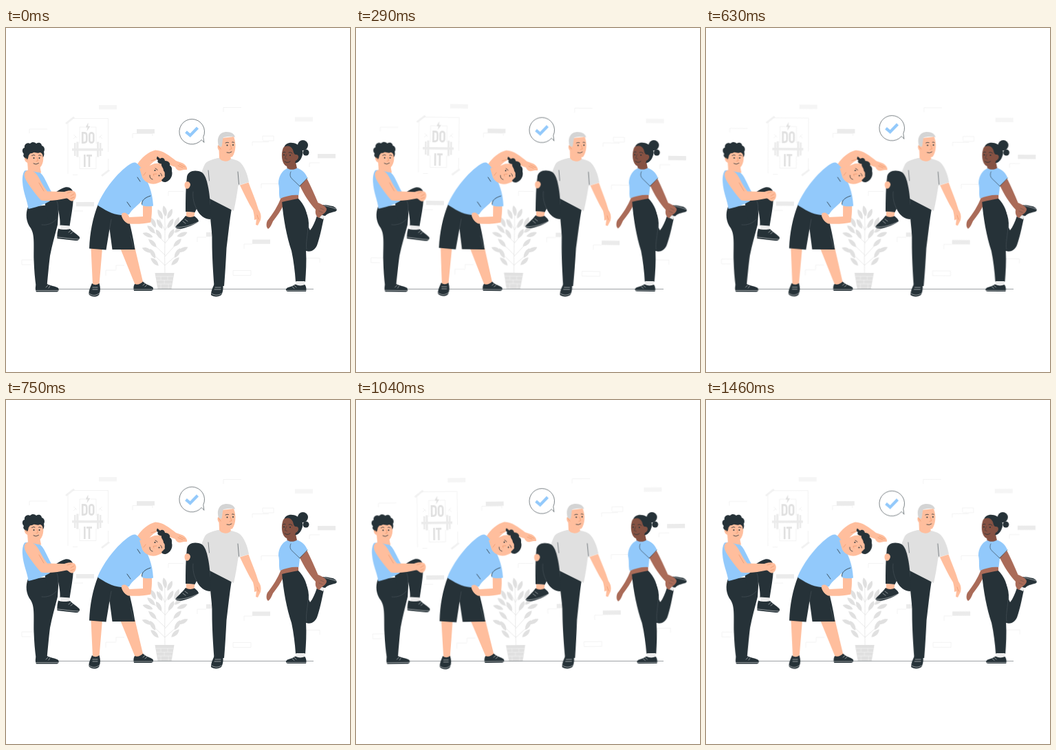
An HTML page that plays this animation: 500x500 px, repeating every 1500 ms.

```html
<!DOCTYPE html>
<html lang="en">
<head>
<meta charset="utf-8">
<title>Stretching class</title>
<style>
html, body { margin: 0; width: 100%; height: 100%; overflow: hidden; background: #fff; }
svg { display: block; width: 100vw; height: 100vh; }
.sway { animation: sway 1.5s linear infinite; }
.float { animation: float 1.5s linear infinite; }
@keyframes sway {
  0%, 100% { transform: rotate(0deg); }
  25% { transform: rotate(1deg); }
  75% { transform: rotate(-1deg); }
}
@keyframes float {
  0%, 100% { transform: translateY(0); }
  50% { transform: translateY(-6.2px); }
}
.dark { fill: #263238; }
.blue { fill: #92c9fb; }
.skin { fill: #ffbe9d; }
.brown { fill: #aa6b58; }
.shade { fill: #865243; }
.gray { fill: #e0e0e0; }
.pale { fill: #ebebeb; }
.line { fill: none; stroke: #263238; stroke-width: .8; stroke-linecap: round; stroke-linejoin: round; }
.soft { stroke: #eb996e; }
.seam { stroke: #4a555b; stroke-width: .6; }
.lace { stroke: #fff; stroke-width: .5; }
.wall { fill: none; stroke: #ebebeb; stroke-width: .6; }
</style>
</head>
<body>
<svg viewBox="0 0 500 500">
  <g class="sway" style="transform-origin:250px 248px">
    <g id="bricks"></g>

    <g id="poster">
      <path class="wall" d="M90 212V138M97 131.500H148.500V180M148.500 190V206M97 213.500H104"/>
      <path class="pale" d="M86 138L98 128.500L100 130.500L88 140ZM138 214L149 205.500L151 207.500L140 216Z" opacity=".7"/>
      <path class="wall" d="M107 168V144H115M123 144H131V168M107 187V204.500H131V187"/>
      <path class="gray" d="M119.500 137.500L115.500 144.500H118.500L117.500 150L122.500 142.800H119.300Z"/>
      <g fill="none" stroke="#e0e0e0" stroke-width="2.600">
        <path d="M111.200 152.400V166.600H113.500Q117.300 166.600 117.300 162.500V156.500Q117.300 152.400 113.500 152.400Z"/>
        <rect x="121.300" y="152.400" width="6" height="14.200" rx="3"/>
        <path d="M114.300 184V202M117 185.400H125M121 185.400V202"/>
      </g>
      <path class="pale" d="M96 175H141V178.500H96ZM99 167H101.500V186H99ZM102.300 165.500H105.500V187.500H102.300ZM132 165.500H135.200V187.500H132ZM136 167H138.500V186H136Z"/>
      <path class="wall" d="M98.500 155L103 160M98 161L102 157M139.500 155L135 160M140 161L136 157"/>
    </g>

    <g id="plant">
      <path d="M231 357C230 325 232 295 230.500 264M231 345L214 329M231 345L248 330M231 330L207 307M231 332L254 307M231 312L211 292M231 313L250 290M231 294L223 278M231 294L239 280" fill="none" stroke="#e0e0e0" stroke-width=".7"/>
      <g id="leaves" class="gray"></g>
      <path class="gray" d="M216.500 356H244.500L240.500 379.500H220.500Z"/>
      <path d="M217.500 361H243.500M218.500 366.500H242.500M219.500 372H241.500M225 361V366M235 361V366M230 366V372M225 372V379M236 372V379" fill="none" stroke="#f3f3f3" stroke-width=".6"/>
    </g>
  </g>

  <path d="M76 379.500H447" stroke="#263238" stroke-width=".6" opacity=".75"/>

  <g class="float">
    <path class="line" d="M284 162.800A18.300 18.300 0 1 1 286.800 158.500L287.800 166Z" style="fill:#fff;stroke-width:.6"/>
    <path d="M261.500 150.800L267.700 156.200L278.500 145" fill="none" stroke="#92c9fb" stroke-width="4.200"/>
  </g>

  <g class="sway" style="transform-origin:65px 275px">
    <path class="dark" d="M32 260C28 270 29 282 36 291C42 301 40 315 40.500 338C41 352 42 364 43.500 375H59.500C61 360 62 347 64 331C67 315 71 302 75 286L77 256Z"/>
    <path class="dark" d="M56 252C66 243 77 234 86 231.500C94 230 99 236 98 246C97.500 260 94.500 274 92.500 288L78.500 287C79 278 77 270 76 264L62 282Z"/>
    <path class="line seam" d="M74 252C76 257 76 261 75 268M52 286C60 287 68 284 73 278"/>
    <path class="pale" d="M79 286.500L92.500 287.500L92 293.500L80 293Z"/>
    <path class="dark" d="M76 291.500C80 293 88 294 93 292C98 297 104 300 107 304C107.500 307 105 309.500 101 309C92 308 83 307 74.500 306C74 300 75 295 76 291.500Z"/>
    <path class="line lace" d="M75 304C84 304.500 95 307 106 307M91 297L94 294.500M94 299L97 296.500"/>
    <path class="dark" d="M43.500 373.500C48 376 55 375 59 371.500C64 375 72 375 76 378C77.500 381 76.500 383.500 73 383.500H44C42.500 381 42.500 377 43.500 373.500Z"/>
    <path class="line lace" d="M43.500 381.500H76M58 377L61 374M62 378L64 375"/>
    <path class="skin" d="M31 193L32 208C36 216 46 218 51 210L49 200Z"/>
    <path class="blue" d="M27 207.500C33 205 39 209 49 210C55 213 60 228 66 238V249L63 252C53 258 42 261 32.500 263C31 250 25 240 24 224C23.500 217 24.500 211 27 207.500Z"/>
    <path class="skin" d="M29 208C37 203 45 211 49 220C53 228 56 232 60 237.500L85 238C90 236 96 235.500 100 238C103.500 242 102 249 97 251.500C93 252 91 248 88 247.500C77 250 63 252 51 250.500C44 243 34 230 29 221C26 215 26 211 29 208Z"/>
    <path class="line soft" d="M48 225L55 237M89 240L95 238M99 241L94 244M99 246L94 248"/>
    <path class="skin" d="M31 179H53C56 189 54 201 47 204.500C40 207 34 202 31.500 196C27 195 25 187 29 186Z"/>
    <path class="dark" d="M29 190C26 188 24 186 26 183C23 180 23 175 27 174C26 169 31 166 35 168C38 165 42 166 44 168C48 165 52 168 52 171C56 172 57 177 55 180C56 184 55 187 53.500 188C54 184 52 181 49 181C46 183 42 180 40 181C37 183 35 181 34 184C32 185 33 189 31 191Z"/>
    <path class="line" d="M37.500 185.500Q40 183.500 42 185M47.500 185Q49 184 51 185.500M40 197Q43.500 199.500 47.500 196.500"/>
    <path class="line soft" d="M45 188L46.500 193L44 193.500M29 189L31 192"/>
    <circle class="dark" cx="40.500" cy="189" r="1"/><circle class="dark" cx="48.500" cy="189" r="1"/>
  </g>

  <g class="sway" style="transform-origin:192px 284px">
    <path class="skin" d="M123.500 320H140L135.500 373H126ZM166 320H187.500L199.500 371L188 374Z"/>
    <path class="dark" d="M125 371C128 374 132 374 135.500 371C137 376 138 382 135 388C131 392 123 391 120.500 387C120 382 123 376 125 371ZM187 372C191 374 196 372 199 368.500C203 373 210 374 213.500 377C215 380 213 382 210 382H186C185 379 185 375 187 372Z"/>
    <path class="line lace" d="M121 386C126 390 132 389 136 385M126 377H133M126 380H133M186 380H213M199 374L202 371.500M202 376L205 373.500"/>
    <path class="dark" d="M134 256L177 273C181 288 185 305 187.500 322H154.500L150.500 292L145.500 322.500L121 320.500C122 297 126 276 134 256Z"/>
    <path class="line seam" d="M150.500 292L153 278M181 302L185 319"/>
    <path class="skin" d="M191 198C197 188 207 180 217 177.500C228 177.500 238 186 247 193L257 196.500C261 199 264 203 263 206L259 206L254 207C250 208 247 205 246 202C238 200 228 193 220 191C212 195 206 202 202 210Z"/>
    <path class="line soft" d="M250 200L257 203M252 198L260 202M211 193L218 191"/>
    <path class="skin" d="M199 256L212 257C212.500 266 211.500 275 210.500 282.500C200 285 188 285 178 284.500C172 282 167 275 168 269.500C172 267 177 269 179 275L199 274Z"/>
    <path class="blue" d="M188 195.500C193 198 198 204 200 212C206 224 213 237 214 258.500C208 260 202 259.500 197 257.500L197.500 251C192 258 183 263 179 271L170 272.500L167 272C154 271 143 264 133 257.500C140 240 157 215 177 200C181 197 185 195 188 195.500Z"/>
    <path class="skin" d="M168 270C172 267 177 269 179 275L178 284.500C172 282 168 276 168 270Z"/>
    <path class="line" d="M197.500 256C197 250 203 246 210 244M176 253L181 260M191 217L195 223"/>
    <path class="skin" d="M194 204C200 203 209 200 216 197L228 196L237 207C236 217 228 224 217 226.500C208 227.500 201 223 198 217Z"/>
    <path class="dark" d="M220 186.500L224 190C227 187 231 190 231 193C237 193 239 197 238 200C242 202 241 206 241 208C243 214 239 222 232 224C229 224.500 226.500 223 226 221L231 216C230 213 232 210 229 207.500C229 203 225 201 226 197.500C222 197 219 195 221 192C218 191 219 188 220 186.500Z"/>
    <path class="line" d="M217 204Q219 204.500 220 206.500M224.500 211Q226.500 212.500 226.500 215M209 214Q208.500 219 213 220"/>
    <path class="line soft" d="M219 212L214 212.500L215 215M203 210L200 214"/>
    <circle class="dark" cx="216.500" cy="207" r="1"/><circle class="dark" cx="222.500" cy="214.500" r="1"/>
  </g>

  <g class="sway" style="transform-origin:308px 270px">
    <path class="dark" d="M296 246L328 262C325 280 323 300 320.500 320C319.500 340 318.500 357 317 375H302.500C301 355 299.500 330 299.500 312C300 300 298 288 297 276Z"/>
    <path class="dark" d="M303 372C307 374 311 374 315 371.500C316 376 316 383 313 388C309 391.500 301 391 298 388C298 382 301 376 303 372Z"/>
    <path class="line lace" d="M299 386C303 389 309 389 313 386M304 377H312M303 380H312"/>
    <path class="gray" d="M308 189C300 191 292 193 289 198C285 206 283 213 282 223L293 226L296 248L331 266C334 253 336 240 337.500 229L353 224C351 212 346 200 340 195C336 192 331 191 327 190Z"/>
    <path class="line" d="M294 207L295.500 222M337 209L338.500 227" stroke-opacity=".7"/>
    <path class="dark" d="M263 216C264 209 272 206 280 208C287 209 290 216 292 223C296 238 298 258 297 278C289 278 281 272 277 263L274.500 268L261 267C261 250 261 232 263 216Z"/>
    <path class="line seam" d="M277 263C273 255 271 247 272 238"/>
    <path class="skin" d="M262 267L274.500 268L273 276L262 275ZM261 224C264 222 268 224 268 228C267 232 265 235 261 233C259 230 259 226 261 224Z"/>
    <path class="dark" d="M261 273C265 275.500 270 275.500 274 273.500C277 276 280 278.500 280 281C276 285 268 288 260 290.500C254 292.500 248 292 246 289.500C249 285 256 280 261 273Z"/>
    <path class="line lace" d="M247 289.500C258 290.500 270 286 279 282M257 281L261 284M260 278L264 281"/>
    <path class="skin" d="M340 228.500L352.500 224.500C357 237 363 250 367 264C370 268 371.500 273 370 279L366 287L363 286L364 278L361 279C361 273 360 269 359 265C352 254 346 241 340 228.500Z"/>
    <path class="line soft" d="M365 272L367 278"/>
    <path class="skin" d="M309 165L310 189C313 195 324 195 327 190L325 184Z"/>
    <path class="skin" d="M313 160L331 158C335 168 334 180 329 187C323 190 315 187 312 179C307 178 306 170 310 169Z"/>
    <path fill="#d4d4d4" d="M309 171C306 162 309 153 317 151.500C325 150 332 153 333 159C329 157 323 158 316 159C314 163 315 169 313 173Z"/>
    <path class="line" d="M319 167Q321 165.500 323.500 166.500M328.500 166Q330 165 331.500 166.500M321 181Q325 182.500 328 180"/>
    <path class="line soft" d="M326 170L328 175.500L325 176.500M309 172L312 176"/>
    <circle class="dark" cx="321.500" cy="170.500" r="1"/><circle class="dark" cx="330" cy="170" r="1"/>
  </g>

  <g class="sway" style="transform-origin:430px 273px">
    <path class="brown" d="M400 246L404 256C400 265 394 273 388 281C386 286 384 290 381 292C378 290 378 284 380 280C388 270 395 259 400 246Z"/>
    <path class="dark" d="M424 252C434 260 441 272 440 290L442 294C446 289 449 282 452 273L462 276C459 290 456 305 452 316C448 325 439 327 433 322L415 290Z"/>
    <path class="dark" d="M401 251L424 247C434 257 439 268 438 284C437 298 435 308 436 323C437 340 436 355 435 369H421C420 354 418 338 415 324C408 303 403 277 401 251Z"/>
    <path class="line seam" d="M439 285C439 302 435 312 437 322"/>
    <path class="pale" d="M421.500 368H434.500L434 375H421Z"/>
    <path class="dark" d="M420.500 372.500C425 375 430 375 434.500 373C436.500 376 437 380 436 383H410C406 382.500 406 379.500 409 377.500C413 376 417 375 420.500 372.500Z"/>
    <path class="line lace" d="M407.500 381.500H435.500M416 376L419 378.500M419 374L422 377"/>
    <path class="pale" d="M453 270L463 274L461 278L452 274Z"/>
    <path class="dark" d="M456 259C461 255 468 258 475 259C480 261 482 264 480 266C476 268 469 268 464 273C458 273 454 268 456 259Z"/>
    <path class="line lace" d="M462 257.500C467 260 473 260 480 263"/>
    <path class="brown" d="M399 238L425 237L425 248C418 249 409 251 401 253Z"/>
    <path class="shade" d="M407 194L409 206C414 211 422 209 423 204L420 190Z"/>
    <path class="blue" d="M409 204C414 207 419 206 423 203.500C430 206 436 211 438 218L427 230L425.500 243C417 242 408 244 398 248C396 241 398 235 396 226C396 216 401 207 409 204Z"/>
    <path class="brown" d="M427 229L437.500 219C443 230 449 243 453.500 254C459 256 465 259 466 263C466 267 463 269 459 272L455 276C451 274 449 270 450 264C441 254 433 242 427 229Z"/>
    <path class="line" d="M427 230L415 218.500C412 215 413 211 414 209M427 230L438 218" stroke-opacity=".75"/>
    <path d="M457 262L462 264M455 266L460 268" class="line" stroke-opacity=".35"/>
    <circle class="dark" cx="431.500" cy="170.500" r="7.500"/><circle class="dark" cx="436" cy="181" r="4.500"/>
    <path class="dark" d="M404 174C406 166 416 165 423 169C431 173 433 181 430 187C428 193 423 197 420 196L410 180Z"/>
    <path class="shade" d="M403 174C408 170 414 171 417 177C418 181 419 184 421 184C426 183 427 190 421 193C420 199 414 202 408 201C401 198 399 184 403 174Z"/>
    <path class="line" d="M402.500 181Q404 179.500 406 180.500M411 181Q413.500 179.500 416 182M405 194Q409 197 413 194"/>
    <path class="line" d="M407.500 184L405.500 189.500L408.500 190.500" stroke-opacity=".6"/>
    <circle class="dark" cx="404" cy="184.500" r="1"/><circle class="dark" cx="413" cy="185" r="1"/>
  </g>
</svg>
<script>
const NS = "http://www.w3.org/2000/svg";
const add = (id, tag, attrs) => {
  const el = document.createElementNS(NS, tag);
  for (const key in attrs) el.setAttribute(key, attrs[key]);
  document.getElementById(id).append(el);
};

const solid = [[135, 112, 1], [420, 129.5, 1], [190, 147], [453, 183], [102, 253], [358, 307.5]];
for (const [x, y, light] of solid)
  add("bricks", "rect", { x, y, width: 26, height: 6.3, fill: light ? "#f5f5f5" : "#ebebeb" });
add("bricks", "rect", { x: 291, y: 297, width: 8, height: 6.3, fill: "#ebebeb" });

const outlines = [
  "M34 153V147H60", "M316 122V115.500H342", "M184 160V153.500H213V157",
  "M373 163V157H389V164H373", "M358 171V165.500H382", "M371 233V226.500H396",
  "M441 202V196H456", "M236 244V237.500H258", "M98 266H112", "M23 344V337H44M23 344H36",
  "M145 360V352H160M160 351V345H172", "M330 359.500V352.500H356V359.500H330",
  "M436 341V334.500H456V341", "M278 311V304H291", "M346 321V314H358"
];
for (const d of outlines) add("bricks", "path", { class: "wall", d });

// Offset from the stem, height and tilt; the left side mirrors the right.
const pairs = [[7, 270, 25], [8, 284, 30], [17, 282, 25], [20, 292, 45], [25, 300, 68],
  [9, 299, 30], [18, 312, 45], [26, 322, 65], [18, 327, 30], [15, 339, 45]];
const leaf = (x, y, turn) => add("leaves", "path", {
  d: "M0 -8C4 -4 4.500 3 0 8C-4 3 -3 -4 0 -8Z",
  transform: `translate(${x} ${y}) rotate(${turn})`
});
leaf(230.5, 266, -12);
for (const [dx, y, turn] of pairs) {
  leaf(231 + dx, y, turn);
  leaf(231 - dx, y + 1, -turn);
}
</script>
</body>
</html>
```
